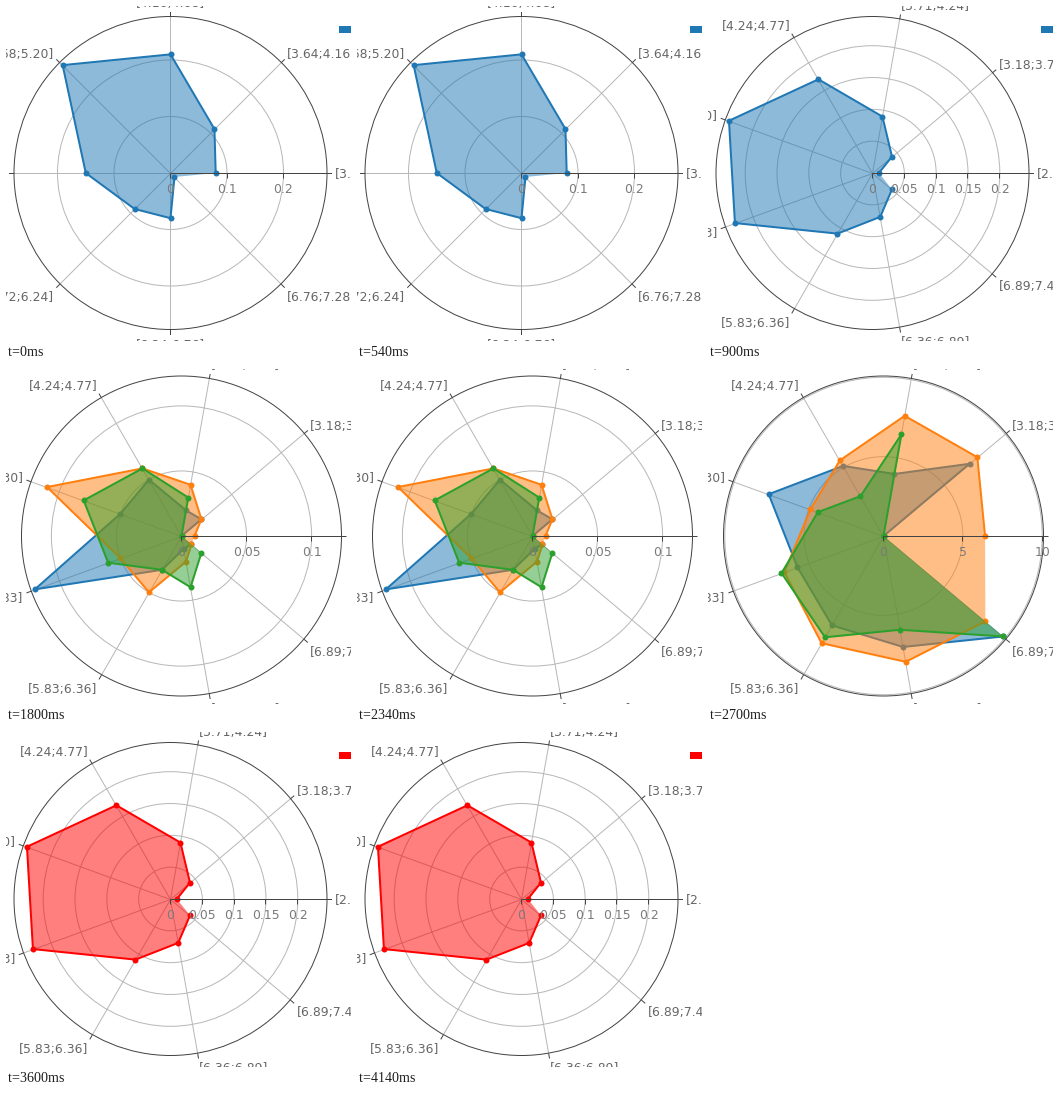
These frames come from a looping animation (345x335 px, 4.5 s). A matplotlib script:

```python
import numpy as np
import matplotlib.pyplot as plt
from matplotlib.animation import FuncAnimation
from matplotlib.patches import Circle, Rectangle

W, H, DPI = 345, 335, 100
PT = 72 / DPI  # points per pixel
CY = 167
TEXT_PX = 12.4
BLUE, ORANGE, GREEN, RED = "#1f77b4", "#ff7f0e", "#2ca02c", "#ff0000"
GRID, AXIS = "#b8b8b8", "#444444"

# Share of values per bin, and the same split into three groups
eight = [.08, .11, .21, .27, .15, .09, .08, .01]
group_a = np.array([0, 2, 2, 5, 5, 12, 3, 1, 1]) / 100
group_b = np.array([1, 2, 4, 6, 11, 5, 5, 2, 1]) / 100
group_c = np.array([0, 0, 3, 6, 8, 6, 3, 4, 2]) / 100
nine = group_a + group_b + group_c

mean_a = [0, 7.08, 3.97, 5.1, 7.7, 5.77, 6.5, 7.1, 9.85]
mean_b = [6.4, 7.72, 7.69, 5.5, 4.9, 6.65, 7.8, 8.05, 8.38]
mean_c = [0, 0, 6.5, 2.9, 4.4, 6.84, 7.37, 6.0, 9.85]

edges_eight = 3.12 + .52 * np.arange(9)
edges_nine = [2.65, 3.18, 3.71, 4.24, 4.77, 5.30, 5.83, 6.36, 6.89, 7.42]

SMALL = dict(cx=164.5, radius=156.5)
LARGE = dict(cx=175.5, radius=160)
FINE = dict(SMALL, scale=636.5, ticks=[0, .05, .1, .15, .2], edges=edges_nine)

CHARTS = [
    dict(SMALL, scale=565, ticks=[0, .1, .2], edges=edges_eight,
         traces=[(eight, BLUE)], key=BLUE),
    dict(FINE, traces=[(nine, BLUE)], key=BLUE),
    dict(LARGE, scale=1301, ticks=[0, .05, .1], edges=edges_nine,
         traces=[(group_a, BLUE), (group_b, ORANGE), (group_c, GREEN)],
         key=None),
    dict(LARGE, scale=15.87, ticks=[0, 5, 10], edges=edges_nine,
         traces=[(mean_a, BLUE), (mean_b, ORANGE), (mean_c, GREEN)],
         key=None),
    dict(FINE, traces=[(nine, RED)], key=RED),
]

fig = plt.figure(figsize=(W / DPI, H / DPI), dpi=DPI, facecolor="white")
ax = fig.add_axes([0, 0, 1, 1])


def line(x, y, color, width, z):
    ax.plot(x, y, color=color, lw=width * PT, zorder=z, snap=False,
            solid_capstyle="butt", solid_joinstyle="round")


def ray(cx, angle, start, end, color, z):
    reach = np.array([start, end])
    line(cx + reach * np.cos(angle), CY + .5 - reach * np.sin(angle),
         color, 1, z)


def ring(cx, radius, color, z):
    ax.add_patch(Circle((cx, CY), radius, fill=False, ec=color,
                        lw=PT, zorder=z))


def label(x, y, text, align, color):
    ax.text(x, y, text, ha=align, va="baseline", color=color, zorder=9,
            family="DejaVu Sans", size=TEXT_PX * PT, clip_on=True)


def draw_trace(cx, angles, radii, color, z):
    x = cx + radii * np.cos(angles)
    y = CY - radii * np.sin(angles)
    ax.fill(x, y, color=color, alpha=.5, lw=0, zorder=z)
    line(x, y, color, 2, z + .1)
    ax.plot(x, y, "o", color=color, ms=6 * PT, mew=0, zorder=z + .2,
            snap=False)


def bin_label(cx, radius, angle, low, high):
    c, s = np.cos(angle), np.sin(angle)
    align = "center" if abs(c) < .01 else "left" if c > 0 else "right"
    # Labels hang below the lower rim and sit on top of the upper one
    drop = np.interp(s, [-1, -.7, -.3, .3, .7, 1],
                     [11.3, 12.2, 7.6, 3.2, 1.5, -1.5])
    reach = radius + 8
    label(cx + reach * c, CY - reach * s + drop,
          f"[{low:.2f};{high:.2f}]", align, "#666666")


def draw(i):
    chart = CHARTS[i]
    cx, radius, scale = chart["cx"], chart["radius"], chart["scale"]
    edges = chart["edges"]
    angles = np.arange(len(edges) - 1) * 2 * np.pi / (len(edges) - 1)

    ax.clear()
    ax.set_xlim(0, W)
    ax.set_ylim(H, 0)
    ax.axis("off")

    for angle, low, high in zip(angles, edges, edges[1:]):
        ray(cx, angle, 0, radius, GRID, 1)
        ray(cx, angle, radius, radius + 5, AXIS, 7)
        bin_label(cx, radius, angle, low, high)

    for z, (values, color) in enumerate(chart["traces"], 2):
        draw_trace(cx, angles, scale * np.array(values), color, z)

    ring(cx, radius, AXIS, 6)
    ray(cx, 0, 0, radius, AXIS, 6)
    for value in chart["ticks"]:
        r = value * scale
        if r:
            ring(cx, r, GRID, 1)
        x = np.floor(cx + r) + .5
        line([x, x], [CY + .5, CY + 5.5], AXIS, 1, 7)
        label(cx + r, CY + 20, f"{value:g}", "center", "#7a7a7a")

    if chart["key"]:
        ax.add_patch(Rectangle((333, 20), 12, 7, color=chart["key"], lw=0))
    return []


anim = FuncAnimation(fig, draw, frames=len(CHARTS), init_func=lambda: [],
                     interval=900, repeat=True, repeat_delay=0)
plt.show()
```
